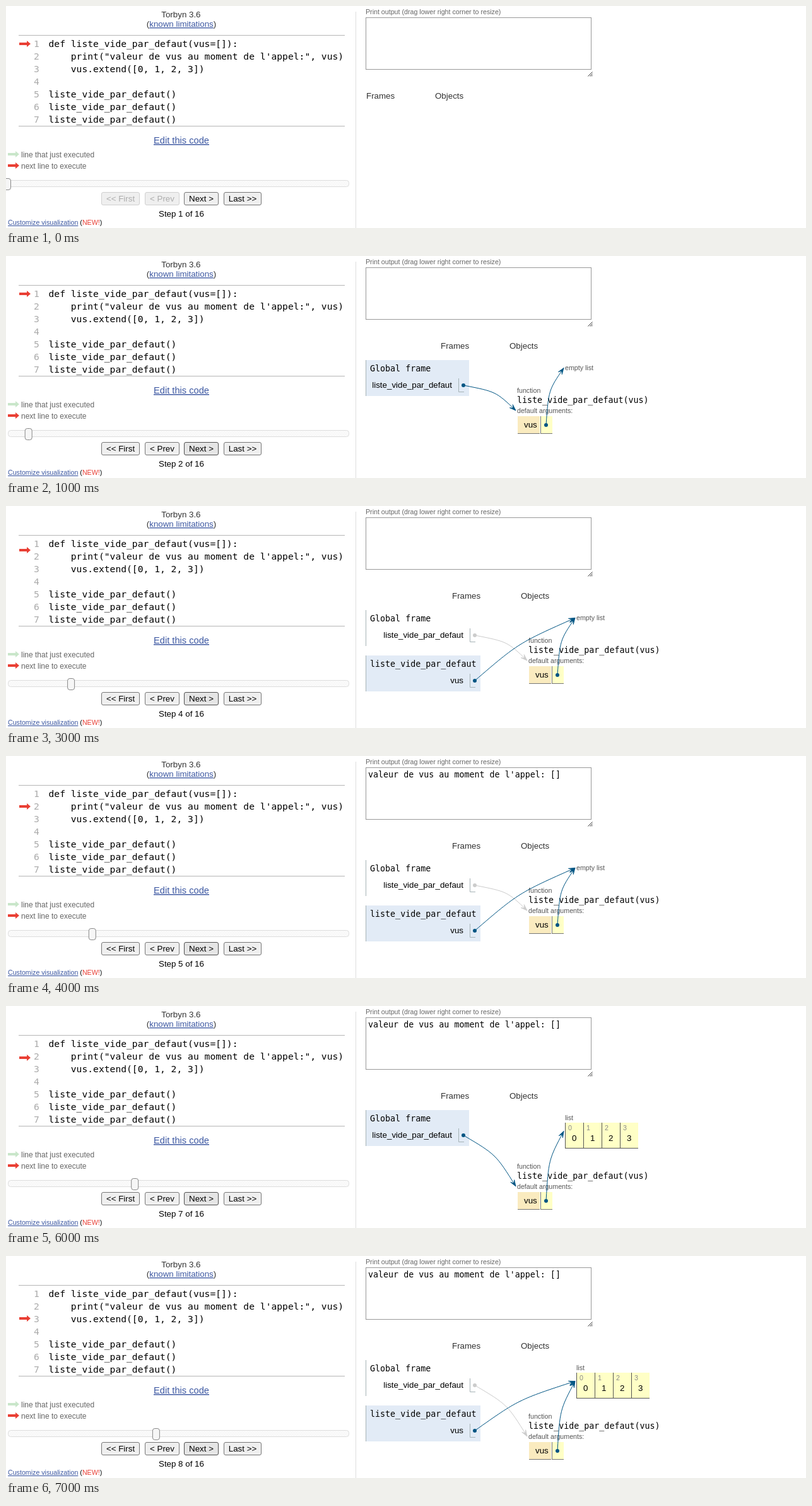
Animation of 1268 by 352 pixels, one loop 8000 ms. Source, as an HTML page:

```html
<!DOCTYPE html>
<html lang="fr">
<head>
<meta charset="utf-8">
<title>Step by step</title>
<style>
  html, body { margin: 0; width: 100%; height: 100%; overflow: hidden; background: #fff; }
  svg { display: block; width: 1268px; height: 352px; }
  text { font: 13.333px "Liberation Sans", Arial, sans-serif; white-space: pre; }
  .mono { font: 13.333px "DejaVu Sans Mono", monospace; }
  .code { font: 14.667px "DejaVu Sans Mono", monospace; }
  .small { font-size: 10.667px; }
  .mid { font-size: 12px; }
  .big { font-size: 14.667px; }
  .link { fill: #3d58a2; text-decoration: underline; }
</style>
</head>
<body>
<svg id="stage" viewBox="0 0 1268 352">
  <defs>
    <pattern id="grain" width="4" height="4" patternUnits="userSpaceOnUse">
      <rect width="4" height="4" fill="#fafafa"/>
      <path d="M0 0h1v1h-1zM2 2h1v1h-1z" fill="#f3f3f3"/>
    </pattern>
  </defs>
  <g id="fixed"></g>
  <g id="live"></g>
</svg>
<script>
const STEP_MS = 1000;
const RED = '#e93f34', GREEN = '#c9e6ca', BLUE = '#005583', PALE = '#cccccc';
const EDGE = '#a6b3b6', DARK = '#555555', YELLOW = '#ffffc6';
const FUNC = 'liste_vide_par_defaut';
const CODE = [
  `def ${FUNC}(vus=[]):`,
  '    print("valeur de vus au moment de l\'appel:", vus)',
  '    vus.extend([0, 1, 2, 3])',
  '',
  FUNC + '()', FUNC + '()', FUNC + '()'
];

// arrow: top of the red pointer; call: a function frame is open
const STEPS = [
  { arrow: 55 },
  { arrow: 55, heap: true },
  { arrow: 59, heap: true, call: true },
  { arrow: 65, heap: true, call: true },
  { arrow: 75, heap: true, call: true, printed: true },
  { arrow: 64, heap: true, call: true, printed: true, filled: true, returned: true },
  { arrow: 77, heap: true, printed: true, filled: true },
  { arrow: 94, heap: true, call: true, printed: true, filled: true }
];

const escape = s => s.replace(/&/g, '&amp;').replace(/</g, '&lt;');
const text = (x, y, s, cls = '', fill = '#000', anchor = 'start') =>
  `<text x="${x}" y="${y}" class="${cls}" fill="${fill}" text-anchor="${anchor}">${escape(s)}</text>`;
const rect = (x, y, w, h, fill, extra = '') =>
  `<rect x="${x}" y="${y}" width="${w}" height="${h}" fill="${fill}" ${extra}/>`;
const line = (d, stroke) => `<path d="${d}" fill="none" stroke="${stroke}"/>`;
const pointer = (x, y, fill) =>
  `<polygon points="0,3 12,3 12,0 18,5 12,10 12,7 0,7" transform="translate(${x} ${y})" fill="${fill}"/>`;

// Bowed connector with a dot at its start and an arrowhead at its end
function connector(x1, y1, x2, y2, bow, color) {
  const cx = (x1 + x2) / 2 + bow, cy = (y1 + y2) / 2 - 10;
  const angle = Math.atan2(y2 - cy, x2 - cx) * 180 / Math.PI;
  return line(`M${x1} ${y1}C${cx} ${cy} ${cx} ${cy} ${x2} ${y2}`, color) +
    `<circle cx="${x1}" cy="${y1}" r="3" fill="${color}"/>` +
    `<path d="M0 0L-10 -3.5L-5.5 0L-10 3.5Z" fill="${color}" stroke="${color}" stroke-width=".8"
      transform="translate(${x2} ${y2}) rotate(${angle})"/>`;
}

function button(x, w, label, state) {
  const off = state === 'off', hover = state === 'hover';
  const stroke = off ? '#d0d0d0' : hover ? '#4f4f4f' : '#767676';
  return rect(x + .5, 295.5, w - 1, 20, hover ? '#e5e5e5' : '#efefef', `rx="2.5" stroke="${stroke}"`) +
    text(x + w / 2, 310, label, '', off ? '#acacac' : '#000', 'middle');
}

function drawFixed() {
  return text(246.3, 18, 'Torbyn 3.6', '', '#333') +
    `<text x="222.8" y="33" fill="#333">(<tspan class="link">known limitations</tspan>)</text>` +
    line('M20 46.5H537M20 190.5H537', '#b5b5b5') +
    CODE.map((s, i) => text(44, 65 + 20 * i, String(i + 1), 'code', '#aaa') +
      text(67.5, 65 + 20 * i, s, 'code')).join('') +
    text(234, 218, 'Edit this code', 'big link', '#3d58a2') +
    pointer(3, 230, GREEN) + text(24, 240, 'line that just executed', 'mid', '#666') +
    pointer(3, 248, RED) + text(24, 258, 'next line to execute', 'mid', '#666') +
    rect(3.5, 276.5, 540, 10, 'url(#grain)', 'rx="4" stroke="#ddd"') +
    `<text x="3" y="347" class="small"><tspan class="link">Customize visualization</tspan> (<tspan fill="${RED}">NEW!</tspan>)</text>` +
    line('M554.5 9V352', '#ddd') +
    text(570, 13, 'Print output (drag lower right corner to resize)', 'small', '#666') +
    rect(570.5, 18.5, 357, 82, '#fff', 'stroke="#999"') +
    line('M922.5 111.5L929.5 104.5M925.5 111.5L929.5 107.5M928 111.5L929.5 110', '#333');
}

function drawControls(step, index) {
  const back = index ? 'on' : 'off';
  return pointer(21, step.arrow, RED) +
    rect(-3.5 + 33.7 * index, 273.5, 11, 18, '#f6f6f6', 'rx="3.5" stroke="#888"') +
    button(151, 61, '<< First', back) + button(220, 55, '< Prev', back) +
    button(282, 55, 'Next >', index ? 'hover' : 'on') + button(345, 60, 'Last >>', 'on') +
    text(242, 334, `Step ${index + 1} of 16`) +
    (step.printed ? text(574, 34, "valeur de vus au moment de l'appel: []", 'mono') : '');
}

function stackFrame(y, w, h, title, active) {
  return (active ? rect(570, y, w, h, '#e2ebf6') : '') +
    line(`M570.5 ${y}V${y + h}`, EDGE) + text(577, y + 18, title, 'mono');
}

const cell = (x, y, h, right) => line(`M${x + .5} ${y}V${y + h - .5}H${right}`, EDGE);

function drawStack(step, dx) {
  let out = stackFrame(165, 182 + dx, 57, 'Global frame', !step.call) +
    text(725 + dx, 209, FUNC, '', '#000', 'end') + cell(735 + dx, 194, 22, 744 + dx);
  if (!step.call) return out;
  const nameX = step.returned ? 697 : 725;
  out += stackFrame(237, 182, step.returned ? 93 : 57, FUNC, true) +
    text(nameX, 281, 'vus', '', '#000', 'end') + cell(nameX + 10, 266, 22, 744);
  if (step.returned) {
    out += text(697, 304, 'Return', 'mid', RED, 'end') + text(697, 318, 'value', 'mid', RED, 'end') +
      cell(707, 290, 34, 744) + text(711, 311, 'None');
  }
  return out;
}

function drawHeap(step, dx) {
  const left = 828 + dx, listX = 904 + dx, y = step.filled ? 254 : 213;
  let out = text(listX, 181, step.filled ? 'list' : 'empty list', 'small', DARK);
  if (step.filled) {
    out += rect(listX, 185, 116, 40, YELLOW) + line(`M${listX} 225.5h116`, DARK);
    for (let i = 0; i < 4; i++) {
      const x = listX + 29 * i;
      out += line(`M${x + .5} 185v41`, DARK) +
        text(x + 5, 197, String(i), 'small', '#888') + text(x + 11, 214, String(i));
    }
  }
  return out + text(left, y + 4, 'function', 'small', DARK) +
    text(left, y + 20, FUNC + '(vus)', 'mono') +
    text(left, y + 36, 'default arguments:', 'small', DARK) +
    rect(left + 1, y + 41, 35, 28, '#faebbf') + rect(left + 37, y + 41, 19, 28, YELLOW) +
    line(`M${left + 1} ${y + 68.5}h35m1 0h19M${left + 37.5} ${y + 41}v28`, '#777') +
    text(left + 11, y + 59, 'vus');
}

function drawConnectors(step, dx) {
  const shift = step.filled ? 41 : 0, listX = 902 + dx, listY = step.filled ? 198.5 : 177.5;
  return connector(743 + dx, 205, 826 + dx, 245 + shift, 10, step.call ? PALE : BLUE) +
    connector(874 + dx, 268 + shift, listX, listY, -10, BLUE) +
    (step.call ? connector(743, 277, listX, listY, -10, BLUE) : '');
}

function drawStep(index) {
  const step = STEPS[index], dx = step.call ? 0 : -18;
  const controls = drawControls(step, index);
  if (!step.heap) {
    return controls + text(571, 147, 'Frames', '', '#333') + text(680, 147, 'Objects', '', '#333');
  }
  return controls + text(707 + dx, 147, 'Frames', '', '#333') + text(816 + dx, 147, 'Objects', '', '#333') +
    drawStack(step, dx) + drawHeap(step, dx) + drawConnectors(step, dx);
}

const live = document.getElementById('live');
document.getElementById('fixed').innerHTML = drawFixed();
const start = performance.now();
let shown = -1;

function tick() {
  const elapsed = Math.max(0, performance.now() - start);
  const index = Math.floor(elapsed / STEP_MS) % STEPS.length;
  if (index !== shown) {
    live.innerHTML = drawStep(index);
    shown = index;
  }
  requestAnimationFrame(tick);
}
tick();
</script>
</body>
</html>
```
